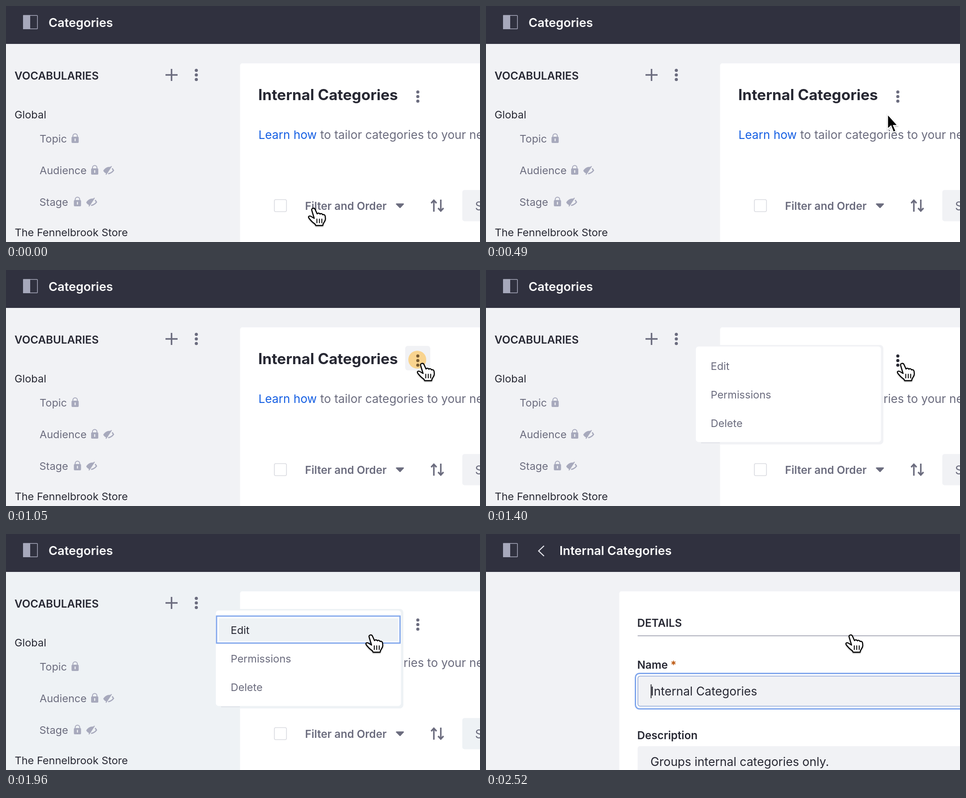
Recreate the animation shown at these times as an HTML page. Size 1058 px wide and 529 px high, loop 2.59 s.

```html
<!DOCTYPE html>
<html lang="en">
<head>
<meta charset="utf-8">
<title>Editing a vocabulary</title>
<style>
  html, body { margin: 0; width: 100%; height: 100%; overflow: hidden; background: #f1f2f5; }
  svg { display: block; width: 1058px; height: 529px; --soft: #f1f2f5; }
  svg.tinted { --soft: #eef2f5; }
  text { font: 400 23.5px Inter, "Open Sans", sans-serif; fill: #6b6c7e; white-space: pre; }
  .dark { fill: #272833; }
  .semi { font-weight: 600; font-size: 24.2px; }
  .big { font-size: 26.5px; }
  .lead { font-size: 26.2px; }
  .head { font-size: 27.2px; fill: #fff; }
  .title { font-weight: 700; font-size: 33.4px; }
  .link { fill: #155fe3; }
  .soft { fill: var(--soft); }
  .gray { fill: #6b6c7e; }
  .icon { fill: #a7a9bc; }
  .line { fill: none; stroke: #6b6c7e; stroke-width: 3.4; }
</style>
</head>
<body>
<svg id="stage" viewBox="0 0 1058 529" xmlns="http://www.w3.org/2000/svg">
  <defs>
    <g id="lock">
      <path d="M-5 -3V-5.500A5 5 0 0 1 5 -5.500V-3" fill="none" stroke="#a7a9bc" stroke-width="2"/>
      <rect class="icon" x="-8" y="-4" width="16" height="14" rx="2"/>
      <path d="M0 1V5" stroke="#f1f2f5" stroke-width="2.400" stroke-linecap="round"/>
    </g>
    <g id="hidden">
      <path class="icon" d="M-12 1C-8 -6 -1 -9 6 -7.500L-5 7C-8 6 -10 4 -12 1Z"/>
      <path d="M6.500 -9.500L-6 9.500" stroke="#a7a9bc" stroke-width="2.200"/>
      <path d="M8 -4.500L11 0C8 4.500 4 6.500 -1 7.500" fill="none" stroke="#a7a9bc" stroke-width="2.600"/>
    </g>
    <g id="dots">
      <circle cy="-10.200" r="3.500"/><circle r="3.500"/><circle cy="10.200" r="3.500"/>
    </g>
    <filter id="shade" x="-30%" y="-30%" width="170%" height="170%">
      <feDropShadow dx="0" dy="1.500" stdDeviation="1.200" flood-opacity=".35"/>
    </filter>
  </defs>

  <rect class="soft" width="1058" height="529"/>
  <rect width="1058" height="85" fill="#30313f"/>
  <rect x="38.750" y="21.250" width="31.500" height="30" rx="1" fill="none" stroke="#a7a9bc" stroke-width="1.500"/>
  <rect class="icon" x="38" y="20.500" width="16" height="31.500"/>

  <g id="listPage">
    <text class="head semi" x="95" y="47">Categories</text>
    <text class="dark semi" x="19" y="165">VOCABULARIES</text>
    <path class="line" d="M356 154.500H383M369.500 141V168"/>
    <use class="gray" href="#dots" x="424.800" y="154.500"/>
    <text class="dark" x="19" y="251.500">Global</text>
    <text x="75" y="305.500">Topic</text>
    <text x="75" y="376.500">Audience</text>
    <text x="74.500" y="447.500">Stage</text>
    <text class="dark" x="19.500" y="515.500">The Fennelbrook Store</text>
    <use href="#lock" x="154.300" y="297"/>
    <use href="#lock" x="198" y="368"/>
    <use href="#lock" x="159.500" y="439"/>
    <use href="#hidden" x="229" y="368.500"/>
    <use href="#hidden" x="191" y="439.500"/>

    <rect x="522.500" y="128.500" width="560" height="420" rx="5" fill="#fff"/>
    <text class="dark title" x="563" y="210.500">Internal Categories</text>
    <rect id="hover" class="soft" x="891" y="170" width="56" height="55" rx="6"/>
    <circle id="press" cx="918" cy="201" r="20" fill="#f9d48f"/>
    <use id="menuDots" href="#dots" x="919.200" y="203"/>
    <text class="lead link" x="563.500" y="298">Learn how</text>
    <text class="lead" x="701.500" y="298">to tailor categories to your needs.</text>

    <rect x="599" y="434" width="27" height="27" rx="3" fill="#fff" stroke="#d9dae0" stroke-width="1.600"/>
    <text class="semi" x="667.500" y="456.500">Filter and Order</text>
    <path class="gray" d="M871.500 442.500H887Q889 443 888 444.500L880.500 452.500Q879.500 453.500 878.500 452.500L870.500 444.500Q869.800 443 871.500 442.500Z"/>
    <path class="line" d="M955 461V436M949 442L955 435.500L961 442M970.500 434V459M964.500 453L970.500 459.500L976.500 453"/>
    <rect class="soft" x="1018.500" y="412.500" width="80" height="70" rx="5"/>
    <text class="big" x="1047" y="457.500">Search</text>

    <g id="menu">
      <rect class="soft" x="467" y="168" width="420" height="223" rx="8"/>
      <path d="M480 387.500H522" stroke="#d3d5dd" stroke-width="1.200"/>
      <rect x="468.500" y="171.500" width="413" height="214" rx="6" fill="#fff"/>
      <g id="pick">
        <rect x="470" y="184" width="409.500" height="60.500" fill="#fff" stroke="#80a6ec" stroke-width="2.800"/>
        <rect class="soft" x="475" y="189" width="400" height="51"/>
      </g>
      <text id="edit" x="501.500" y="224">Edit</text>
      <text x="501.500" y="288">Permissions</text>
      <text x="501.500" y="352">Delete</text>
    </g>
    <circle id="fade" cx="804" cy="218" r="20" fill="#f9d48f"/>
  </g>

  <g id="formPage">
    <path d="M129.500 26.500L117.500 38L129.500 49.500" fill="none" stroke="#e7e7ed" stroke-width="2.400"/>
    <text class="head semi" x="164" y="47">Internal Categories</text>
    <rect x="297.500" y="128.500" width="800" height="420" rx="5" fill="#fff"/>
    <text class="dark semi" x="337.500" y="208">DETAILS</text>
    <path d="M338.500 228.300H1058" stroke="#9293a5" stroke-width="1.500"/>
    <text class="dark semi" x="337.500" y="301.500">Name</text>
    <text class="semi" x="412" y="301.500" style="fill:#b95000">*</text>
    <rect x="333.500" y="312.500" width="760" height="79.500" rx="9" fill="#fff" stroke="#80a6ec" stroke-width="3"/>
    <rect class="soft" x="339" y="318.500" width="760" height="67.500" rx="5" stroke="#8aa5d8" stroke-width="1.500"/>
    <text class="dark big" x="367.500" y="362">Internal Categories</text>
    <path d="M368.500 337V368" stroke="#1c1c24" stroke-width="1.800"/>
    <text class="dark semi" x="337.500" y="459.500">Description</text>
    <rect class="soft" x="338.500" y="475.500" width="760" height="80" rx="5"/>
    <text class="dark big" x="367" y="520">Groups internal categories only.</text>
  </g>

  <g id="cursor" filter="url(#shade)">
    <g id="hand" stroke="#000" stroke-width="2.400" stroke-linejoin="round" stroke-linecap="round">
      <path fill="#fff" d="M-3.500 3.500C-4.500 -1 2 -2.500 4 2L8.500 12C9.500 9.500 13.500 9.500 15 12.500C16.500 10.500 19.500 11 21 14C23.500 12.500 26 14.500 26.500 17.500L27 23C27 28.500 23 31 22 34L21 38H5.500L4 35C1 32.500 -3 30 -5.500 26.500C-8.500 23 -11.500 21 -10.500 18C-9 15.500 -5 17 -3 19L2 22Z"/>
      <path d="M8 23.500V32M13.500 23.500V32M19 23.500V32" stroke-width="2"/>
    </g>
    <path id="arrow" fill="#000" stroke="#fff" stroke-width="2" d="M0 0V33L7.500 26L13 40L18.500 37.500L13 25H22.500Z"/>
  </g>
</svg>
<script>
const LOOP = 2590, STEP = 70;
const el = id => document.getElementById(id);
const show = (id, on) => { el(id).style.display = on ? "" : "none"; };
const clamp = v => Math.min(1, Math.max(0, v));
const ease = u => u < 0.5 ? 4 * u ** 3 : 1 - 4 * (1 - u) ** 3;

// Cursor legs: start and end time, start and end point
const legs = [
  { from: 70, to: 690, a: [686, 454], b: [929, 210] },
  { from: 1440, to: 1900, a: [929, 210], b: [814, 227] }
];
const OPEN = 1190, CLOSE = 2170, FORM = 2310;

function cursorAt(t) {
  const leg = t < legs[1].from ? legs[0] : legs[1];
  const p = ease(clamp((t - leg.from) / (leg.to - leg.from)));
  return leg.a.map((v, i) => v + (leg.b[i] - v) * p);
}

// Click halo: quick rise, short hold, fade
const halo = (t, start) =>
  t < start ? 0 : Math.min(clamp((t - start + STEP) / STEP), clamp((start + 220 - t) / 110));

function draw(t) {
  const [x, y] = cursorAt(t);
  const onFilter = y > 430;
  const onButton = x > 890 && y < 226;
  const open = t >= OPEN && t < CLOSE;
  const onEdit = open && x < 881;
  const form = t >= FORM;
  const press = halo(t, 980);

  show("listPage", !form);
  show("formPage", form);
  show("menu", open);
  show("pick", onEdit);
  show("hover", onButton && !open);
  el("press").style.opacity = press;
  el("fade").style.opacity = halo(t, 2030);
  el("menuDots").style.fill =
    open && onButton ? "#272833" : press > 0.5 ? "#77592f" : "#6b6c7e";
  el("edit").classList.toggle("dark", onEdit);
  el("stage").classList.toggle("tinted", onEdit);

  const pointing = onFilter || onButton || onEdit || t >= CLOSE;
  show("hand", pointing);
  show("arrow", !pointing);
  el("cursor").setAttribute("transform", `translate(${x} ${y})`);
}

const began = performance.now();
function tick() {
  const t = (performance.now() - began) % LOOP;
  draw(Math.floor(t / STEP) * STEP);
  requestAnimationFrame(tick);
}
tick();
</script>
</body>
</html>
```
